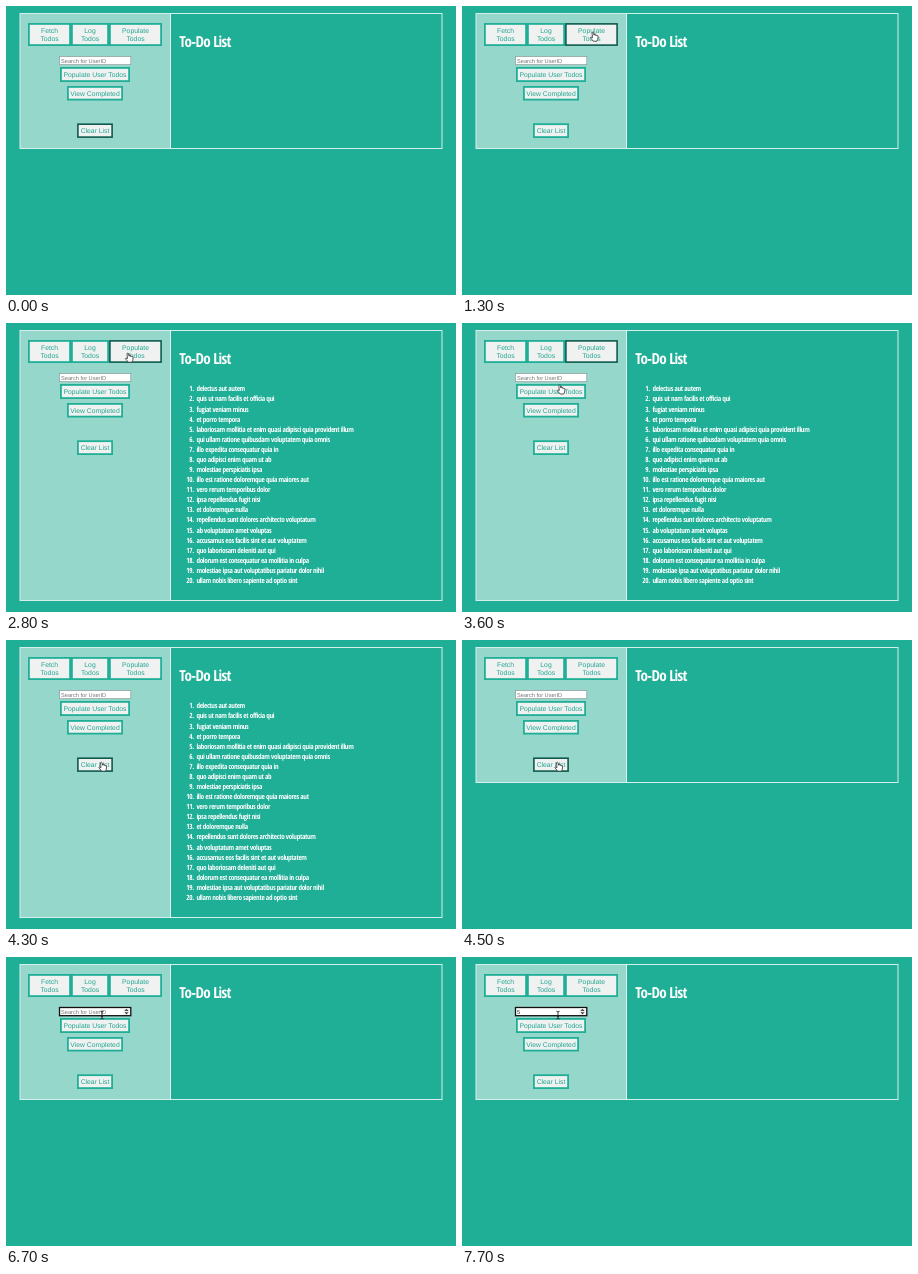
An HTML page that plays this animation: 450 px wide and 289 px high, repeating every 8 s.

```html
<!DOCTYPE html>
<html lang="en">
<head>
<meta charset="utf-8">
<title>To-Do List</title>
<style>
  html, body { margin: 0; width: 100%; height: 100%; overflow: hidden; background: #1fae96; }
  svg { display: block; width: 450px; height: 289px; }
  text { font: 6.8px "Liberation Sans", Arial, sans-serif; fill: #1fa58f; text-rendering: geometricPrecision; }
  .heading, .todo {
    font-family: "Open Sans Condensed", "Open Sans", "Noto Sans", sans-serif;
    font-weight: 700; font-stretch: 75%; letter-spacing: -.045em; fill: #fff;
  }
  .heading { font-size: 15.2px; }
  .todo { font-size: 7.2px; }
  .label { text-anchor: middle; }
  .number { text-anchor: end; }
  .button rect { fill: #f0f2f1; stroke: #1fae96; stroke-width: 1.8; }
  .button.focus rect { stroke: #0d5a4d; stroke-width: 1.6; }
  #field { fill: #fff; stroke: #8a9b97; stroke-width: .7; }
  #field.focus { stroke: #111; stroke-width: 1.3; }
  #value { font-size: 5.65px; }
</style>
</head>
<body>
<svg viewBox="0 0 450 289">
  <rect id="sidebar" x="14" y="7" width="150" fill="#95d7cb"/>
  <rect id="frame" x="14" y="7.5" width="422" fill="none" stroke="#d5efea"/>
  <path id="divider" stroke="#e6f6f3"/>
  <text class="heading" x="173.2" y="41">To-Do List</text>
  <g id="todos"></g>
  <g id="buttons"></g>
  <rect id="field" x="53.5" y="50.5" width="71.3" height="8.2"/>
  <text id="value" x="55" y="56.6"></text>
  <path id="caret" d="M55.4 52v5.4" stroke="#111" stroke-width=".6"/>
  <g id="spinner">
    <rect x="117.5" y="51.5" width="6" height="6.2" fill="#eee"/>
    <path d="M118.5 53.9l2-2.2 2 2.2zM118.5 55.3l2 2.2 2-2.2z" fill="#444"/>
  </g>
  <g id="cursor" stroke-linejoin="round">
    <path id="arrow" d="M0 0V9.2L2.2 7.2 3.7 10.6 5.2 10 3.7 6.6H6.6Z" fill="#111" stroke="#fff" stroke-width=".7"/>
    <path id="hand" d="M0 .7Q.8-.4 1.5.7L2.1 3.2Q3-.1 3.4 3.4 4.5 2.4 4.8 3.8 6 3 6.1 4.7L5.8 7.2 5 9.2H1.3L-1.6 5.7Q-1.5 4.4.5 5.6Z" fill="#fff" stroke="#222" stroke-width=".75"/>
    <path id="beam" d="M-1.6-3.8Q0-3.8 0-2.6 0-3.8 1.6-3.8M0-2.6V2.8M-1.6 4Q0 4 0 2.8 0 4 1.6 4M-1 1.5H1" fill="none" stroke="#222" stroke-width=".9"/>
  </g>
</svg>
<script>
const DURATION = 8000, STEP = 100;
const $ = id => document.getElementById(id);

const todos = [
  "delectus aut autem", "quis ut nam facilis et officia qui", "fugiat veniam minus",
  "et porro tempora", "laboriosam mollitia et enim quasi adipisci quia provident illum",
  "qui ullam ratione quibusdam voluptatem quia omnis", "illo expedita consequatur quia in",
  "quo adipisci enim quam ut ab", "molestiae perspiciatis ipsa",
  "illo est ratione doloremque quia maiores aut", "vero rerum temporibus dolor",
  "ipsa repellendus fugit nisi", "et doloremque nulla",
  "repellendus sunt dolores architecto voluptatum", "ab voluptatum amet voluptas",
  "accusamus eos facilis sint et aut voluptatem", "quo laboriosam deleniti aut qui",
  "dolorum est consequatur ea mollitia in culpa",
  "molestiae ipsa aut voluptatibus pariatur dolor nihil", "ullam nobis libero sapiente ad optio sint"
];
$("todos").innerHTML = todos.map((todo, i) => {
  const y = 68.4 + i * 10.08;
  return `<text class="todo number" x="187.8" y="${y}">${i + 1}.</text>
          <text class="todo" x="190.4" y="${y}">${todo}</text>`;
}).join("");

const buttons = [
  { name: "fetch", box: [22, 17, 43, 23], lines: ["Fetch", "Todos"] },
  { name: "log", box: [65, 17, 38, 23], lines: ["Log", "Todos"] },
  { name: "populate", box: [103, 17, 53, 23], lines: ["Populate", "Todos"] },
  { name: "user", box: [54, 61, 70, 15], lines: ["Populate User Todos"] },
  { name: "completed", box: [61, 80, 56, 14.5], lines: ["View Completed"] },
  { name: "clear", box: [71, 117.3, 36, 14.7], lines: ["Clear List"] }
];
$("buttons").innerHTML = buttons.map(({ name, box: [x, y, w, h], lines }) => {
  const first = y + h / 2 + 2.4 - (lines.length - 1) * 3.95;
  const labels = lines.map((line, i) =>
    `<text class="label" x="${x + w / 2}" y="${first + i * 7.9}">${line}</text>`).join("");
  return `<g class="button" id="${name}"><rect x="${x + .9}" y="${y + .9}"
    width="${w - 1.8}" height="${h - 1.8}"/>${labels}</g>`;
}).join("");

// Pointer stops: time, x, y
const stops = [
  [0, 96, -14], [100, 96, 0], [300, 109, 3], [500, 109, 3], [900, 125, 19], [1300, 130, 26],
  [1400, 138, 34], [1800, 215, 120], [2300, 302, 240], [2400, 323, 247], [2500, 124, 32],
  [2700, 124, 32], [2800, 121, 30], [3300, 97, 57], [3500, 97, 57], [4100, 94.5, 122],
  [4700, 94.5, 122], [5600, 96, 58], [DURATION, 96, 58]
];
const ease = k => k * k * (3 - 2 * k);

function pointerAt(time) {
  const next = stops.findIndex(stop => stop[0] > time);
  const [t0, x0, y0] = stops[next - 1], [t1, x1, y1] = stops[next];
  const k = ease((time - t0) / (t1 - t0));
  return [x0 + (x1 - x0) * k, y0 + (y1 - y0) * k];
}

const inside = ([x, y], [left, top, w, h]) => x >= left && x <= left + w && y >= top && y <= top + h;
const show = (id, visible) => $(id).style.display = visible ? "" : "none";

function focusAt(time) {
  if (time < 1200) return "clear";
  if (time < 4300) return "populate";
  return time < 5900 ? "clear" : "field";
}

function render(time) {
  const listed = time >= 1400 && time < 4500;
  const bottom = listed ? 277.5 : 142.5;
  $("sidebar").setAttribute("height", bottom - 7);
  $("frame").setAttribute("height", bottom - 7.5);
  $("divider").setAttribute("d", `M164.5 7.5V${bottom}`);
  show("todos", listed);

  const focus = focusAt(time);
  for (const id of [...buttons.map(b => b.name), "field"]) $(id).classList.toggle("focus", id === focus);

  const pointer = pointerAt(time);
  const overField = inside(pointer, [53, 50, 72, 9]);
  const overButton = buttons.some(b => inside(pointer, b.box));
  const overText = overField || listed && inside(pointer, [180, 60, 250, 205]);
  $("cursor").setAttribute("transform", `translate(${pointer})`);
  show("hand", overButton);
  show("beam", overText);
  show("arrow", !overButton && !overText);
  show("spinner", overField || focus === "field");

  const typed = time >= 7200;
  $("value").textContent = typed ? "5" : "Search for UserID";
  $("value").style.fill = typed ? "#222" : "#777";
  const blinkStart = typed ? 7200 : 5900;
  show("caret", focus === "field" && (time - blinkStart) % 1000 < 500);
  $("caret").setAttribute("transform", `translate(${typed ? 3.2 : 0})`);
}

const start = performance.now();
function tick() {
  const time = (performance.now() - start) % DURATION;
  render(Math.floor(time / STEP) * STEP);
  requestAnimationFrame(tick);
}
tick();
</script>
</body>
</html>
```
